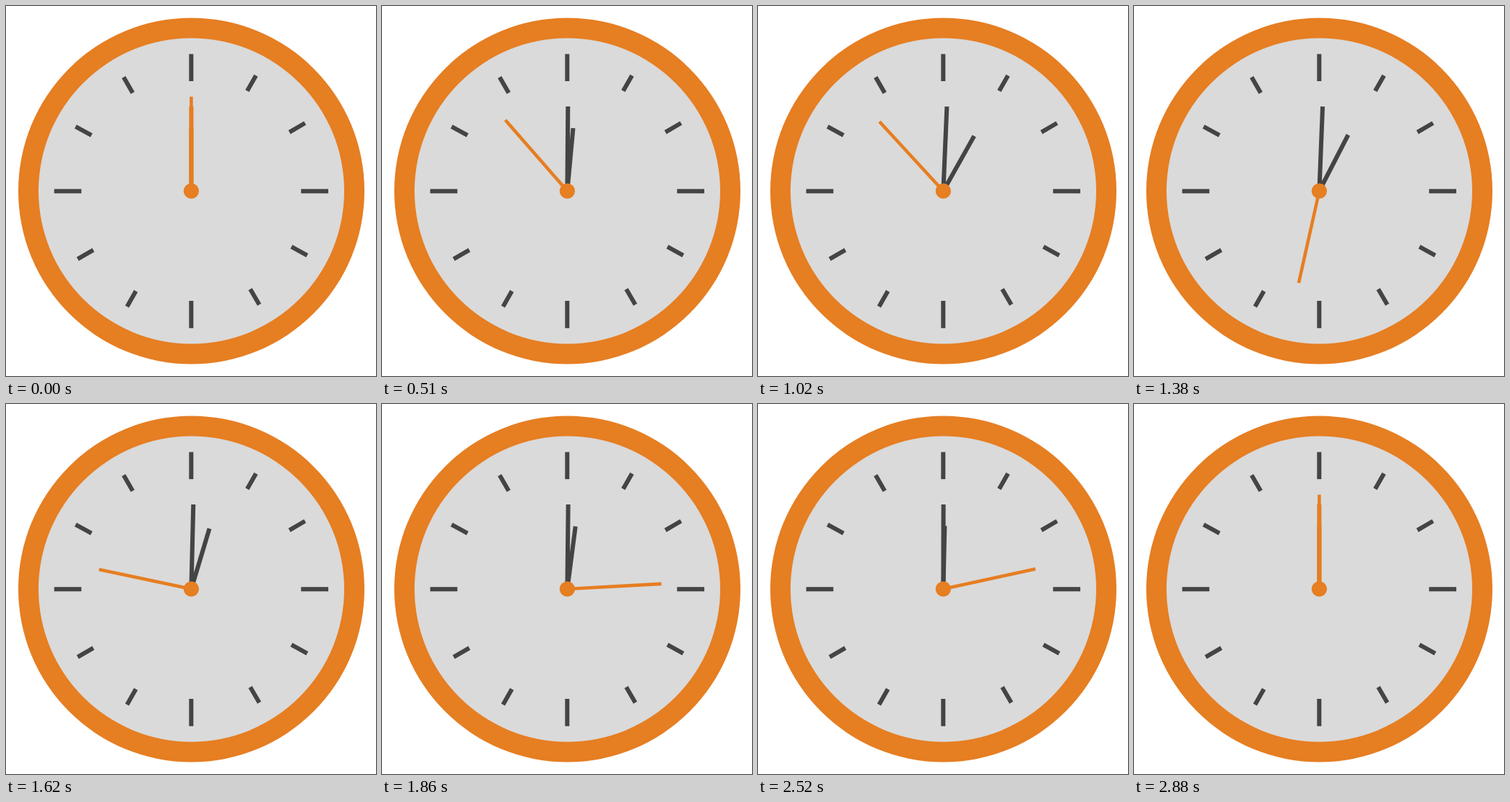
These frames come from a looping animation (512 by 512 pixels, 2910 ms). An HTML page:

```html
<!DOCTYPE html>
<html lang="en">
<head>
<meta charset="utf-8">
<title>Clock</title>
<style>
  html, body { margin: 0; width: 100%; height: 100%; overflow: hidden; background: #fff; }
  svg { display: block; width: 100%; height: 100%; }
</style>
</head>
<body>
<svg viewBox="0 0 512 512">
  <circle cx="256.5" cy="256" r="239.5" fill="#e67e22"/>
  <circle cx="256.5" cy="256" r="211.5" fill="#dadada"/>
  <path stroke="#444" stroke-width="6" fill="none" d="
    M256.3 66.5V104 M256.3 408V445.7 M66.7 256.2H104.3 M408.3 256.2H446
    M345.9 96.2L333.8 117.6 M413.8 162L392.2 174.6
    M395 333.2L416.8 345.2 M338 391.7L350.5 413.2
    M179.7 394.5L167.5 416 M120.8 337.7L99.2 350.2
    M96.3 166.8L118.3 178.8 M162.8 98.5L175.3 120.2"/>
  <g transform="translate(256.4 256)" stroke-width="6">
    <path id="hour" d="M0 0V-87.3"/>
    <path id="minute" d="M0 0V-117"/>
    <path id="second" d="M0 0V-130.5" stroke="#e67e22" stroke-width="4.6"/>
    <circle r="10.6" fill="#e67e22"/>
  </g>
</svg>
<script>
const STEP = 30, STEPS = 97;

// Hour-hand motion: [step, degrees, degrees per step]
const KEYS = [
  [0, 0, 0], [7, 1.317, .358], [17, 5.315, .433], [34, 29.29, .355],
  [38, 30, 0], [46, 27.21, -.7], [62, 7.448, -.385], [72, 4.14, -.258], [96, 0, 0]
];

const [hour, minute, second] = ['hour', 'minute', 'second'].map(id => document.getElementById(id));

// Cubic Hermite interpolation between neighbouring keys
function hourAngle(step) {
  const i = Math.max(1, KEYS.findIndex(key => key[0] >= step));
  const [t0, a, va] = KEYS[i - 1], [t1, b, vb] = KEYS[i];
  const span = t1 - t0, u = (step - t0) / span, w = 1 - u;
  return a * w * w * (1 + 2 * u) + b * u * u * (3 - 2 * u)
    + span * u * w * (va * w - vb * u);
}

const turn = (hand, angle) => hand.setAttribute('transform', `rotate(${angle})`);

function draw(ms) {
  const angle = hourAngle(Math.floor(ms / STEP) % STEPS);
  const color = angle < 1e-6 ? '#e17a1f' : '#444';
  turn(hour, angle);
  turn(minute, angle / 12);
  turn(second, angle * 60);
  hour.setAttribute('stroke', color);
  minute.setAttribute('stroke', color);
}

let start;
function tick(now) {
  start ??= now;
  draw(now - start);
  requestAnimationFrame(tick);
}
draw(0);
requestAnimationFrame(tick);
</script>
</body>
</html>
```
